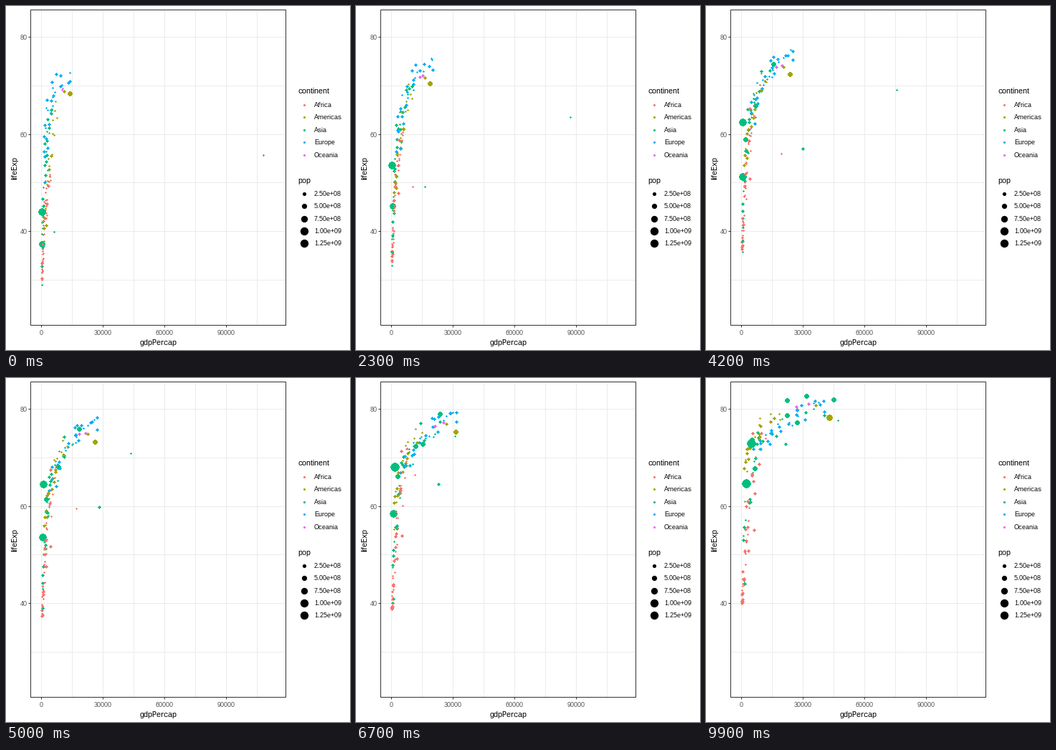
Write a matplotlib script that moves like this. It is 480 px wide and 480 px high and loops after 10000 ms.

```python
import numpy as np
import matplotlib.pyplot as plt
from matplotlib.animation import FuncAnimation
from matplotlib.patches import Rectangle

plt.rcParams.update({"font.family": "Liberation Sans",
                     "text.hinting": "native", "text.hinting_factor": 1})

W, DPI = 480, 96
PT = 72 / DPI
FRAMES, STEP = 100, 9          # nine frames per five-year survey
T = np.linspace(0, 1, 12)      # the twelve surveys
LEFT, TOP, RIGHT, BOTTOM = 34.5, 5.5, 390.5, 445.5
GRID, DARK, GREY = "#EBEBEB", "#333333", "#4D4D4D"
rng = np.random.default_rng(7)

COLORS = {"Africa": "#F8766D", "Americas": "#A3A500", "Asia": "#00BF7D",
          "Europe": "#00B0F6", "Oceania": "#E76BF3"}

# Each range is (poorest, richest, bend) across the countries of a continent.
# Income is in thousands, population in millions.
CONTINENTS = {
    "Africa": dict(n=51, pop=3.2, growth=3.8, ease=1.8, power=1,
                   income=[(.35, 4.5, 1), (.3, 12, 1)],
                   life=[(30, 52, 1.2), (40, 75, 1.8)]),
    "Americas": dict(n=23, pop=4, growth=2.7, ease=1.2, power=.8,
                     income=[(1.4, 8, 1), (1.6, 19, 1)],
                     life=[(38, 67, 1), (61, 79, .5)]),
    "Asia": dict(n=28, pop=8, growth=2.9, ease=1.2, power=.15,
                 income=[(.35, 5, 1), (.95, 45, 1)],
                 life=[(29, 65, 1), (44, 82, .5)]),
    "Europe": dict(n=30, pop=8, growth=1.25, ease=1.3, power=1,
                   income=[(1.4, 14, 1), (6, 46, .6)],
                   life=[(50, 72.7, .5), (71.8, 81.7, .8)]),
    "Oceania": dict(n=2, pop=4, growth=2.2, ease=1, power=1,
                    income=[(10, 10.6, 1), (25, 34.5, 1)],
                    life=[(69, 69.5, 1), (80, 81.3, 1)]),
}

# The few that stand out: population first/last, then evenly spaced keys.
STANDOUTS = [
    ("Asia", (556, 1319), (.4, .6, 1.7, 5), (44, 49.5, 60, 64.5, 68, 71, 73)),
    ("Asia", (372, 1110), (.55, .7, 1.1, 2.45), (37.4, 48.5, 58.5, 64.7)),
    ("Asia", (86, 127), (3.2, 13, 23.8, 31.7), (63, 72.7, 79, 82.6)),
    ("Asia", (.16, 2.5), (108.4, 113.5, 95.5, 80.9, 109.3, 59.3,
                          31.4, 28.1, 34.9, 40.3, 35.1, 47.3),
     (55.6, 67, 74.5, 77.6)),
    ("Asia", (4, 28), (6.5, 12.5, 33, 24, 21.5, 21.7), (39.9, 60, 72.8)),
    ("Americas", (157, 301), (14, 21, 31, 43), (68.4, 71.2, 75.2, 78.2)),
    ("Americas", (15, 33), (11.4, 18.5, 26.5, 36.3), (68.8, 80.7)),
    ("Africa", (1, 6), (2.4, 8, 22, 13, 9.5, 12.1), (42.7, 52, 66.6, 74)),
]


def across(rank, lo, hi, bend, log=False):
    u = rank ** bend
    return lo * (hi / lo) ** u if log else lo + (hi - lo) * u


def shuffle_rank(rank, sd):
    return np.clip(rank + rng.normal(0, sd, rank.shape), 0, 1)


def populate(n, pop, growth, ease, power, income, life):
    """Paths of n countries, shaped (n, 3, surveys)."""
    rank = ((np.arange(n) + .5) / n)[:, None]
    g0, g1 = (across(shuffle_rank(rank, .08), *r, log=True) for r in income)
    l0, l1 = (across(shuffle_rank(rank, .08), *r) for r in life)
    people = np.clip(pop * rng.lognormal(0, 1, (n, 1)), .1, 70) * growth ** T
    gdp = ((1 - T) * g0 ** power + T * g1 ** power) ** (1 / power)
    years = l0 + (l1 - l0) * (1 - (1 - T) ** ease)
    years += np.sin(np.pi * T) * rng.normal(0, .3, (n, 12))
    return np.stack([people, gdp, years], axis=1)


def spread(keys):
    return np.interp(T, np.linspace(0, 1, len(keys)), keys)


def px(income):
    return np.floor(49.3 + 2.865 * np.asarray(income)) + .5


def py(life):
    return np.floor(43.6 + 6.775 * (80 - np.asarray(life))) + .5


def pixel_area(r):
    """Marker area whose hard-edged disc spans 2r + 1 pixels."""
    return (2 * (1.03 * r - .5) * PT) ** 2


def dot_area(pop):
    size = 1 + 5 * np.sqrt(np.clip(pop - .06, 0, None) / 1318.6)
    return pixel_area(np.floor(.375 * (2.845 * size + .945) + .15))


groups, colors = [], []
for name, rule in CONTINENTS.items():
    groups.append(populate(**rule))
    colors += [COLORS[name]] * rule["n"]
for name, (p0, p1), income, life in STANDOUTS:
    groups.append([[p0 * (p1 / p0) ** T, spread(income), spread(life)]])
    colors.append(COLORS[name])
paths = np.concatenate(groups)
order = rng.permutation(len(paths))
paths, colors = paths[order], np.array(colors)[order]

fig = plt.figure(figsize=(W / DPI, W / DPI), dpi=DPI, facecolor="white")
ax = fig.add_axes([0, 0, 1, 1])
ax.set(xlim=(0, W), ylim=(W, 0))
ax.axis("off")


def line(xs, ys, color):
    ax.plot(xs, ys, color=color, lw=PT, zorder=1, snap=False,
            solid_capstyle="butt")


def label(x, y, text, size=9, color="black", **kw):
    ax.text(x, y, text, fontsize=size * PT, color=color, va="baseline", **kw)


def dots(x, y, area, color):
    return ax.scatter(x, y, s=area, c=color, linewidths=0, antialiased=False,
                      snap=False, zorder=2)


for g in range(0, 106, 15):
    line([px(g)] * 2, [TOP, BOTTOM], GRID)
for v in range(30, 81, 10):
    line([LEFT, RIGHT], [py(v)] * 2, GRID)
for g in range(0, 91, 30):
    label(px(g) - .5, 459, str(g * 1000), color=GREY, ha="center")
    line([px(g)] * 2, [BOTTOM, BOTTOM + 3], DARK)
for v in (40, 60, 80):
    label(29.5, py(v) + 3.5, str(v), color=GREY, ha="right")
    line([LEFT - 3, LEFT], [py(v)] * 2, DARK)
ax.add_patch(Rectangle((LEFT, TOP), RIGHT - LEFT, BOTTOM - TOP, fill=False,
                       ec=DARK, lw=PT, zorder=3, snap=False))
label(212.5, 473, "gdpPercap", 11, ha="center")
label(15.5, 225.5, "lifeExp", 11, rotation=90, rotation_mode="anchor",
      ha="center")

label(407, 122, "continent", 11)
for i, (name, color) in enumerate(COLORS.items()):
    y = 137.5 + round(17.4 * i)
    dots([415.5], [y], pixel_area(2), color)
    label(430, y + 3.5, name)
label(407, 247, "pop", 11)
for i, pop in enumerate(range(250, 1251, 250)):
    y = 261.5 + round(17.3 * i)
    dots([415.5], [y], dot_area(pop), "black")
    label(430, y + 3.5, f"{pop * 1e6:.2e}")

points = dots(px(paths[:, 1, 0]), py(paths[:, 2, 0]),
              dot_area(paths[:, 0, 0]), colors)


def draw(i):
    k = min(i // STEP, len(T) - 2)
    f = i / STEP - k
    pop, income, life = ((1 - f) * paths[..., k] + f * paths[..., k + 1]).T
    points.set_offsets(np.column_stack([px(income), py(life)]))
    points.set_sizes(dot_area(pop))
    return points,


anim = FuncAnimation(fig, draw, frames=FRAMES, interval=100, repeat=True,
                     repeat_delay=0)
plt.show()
```
